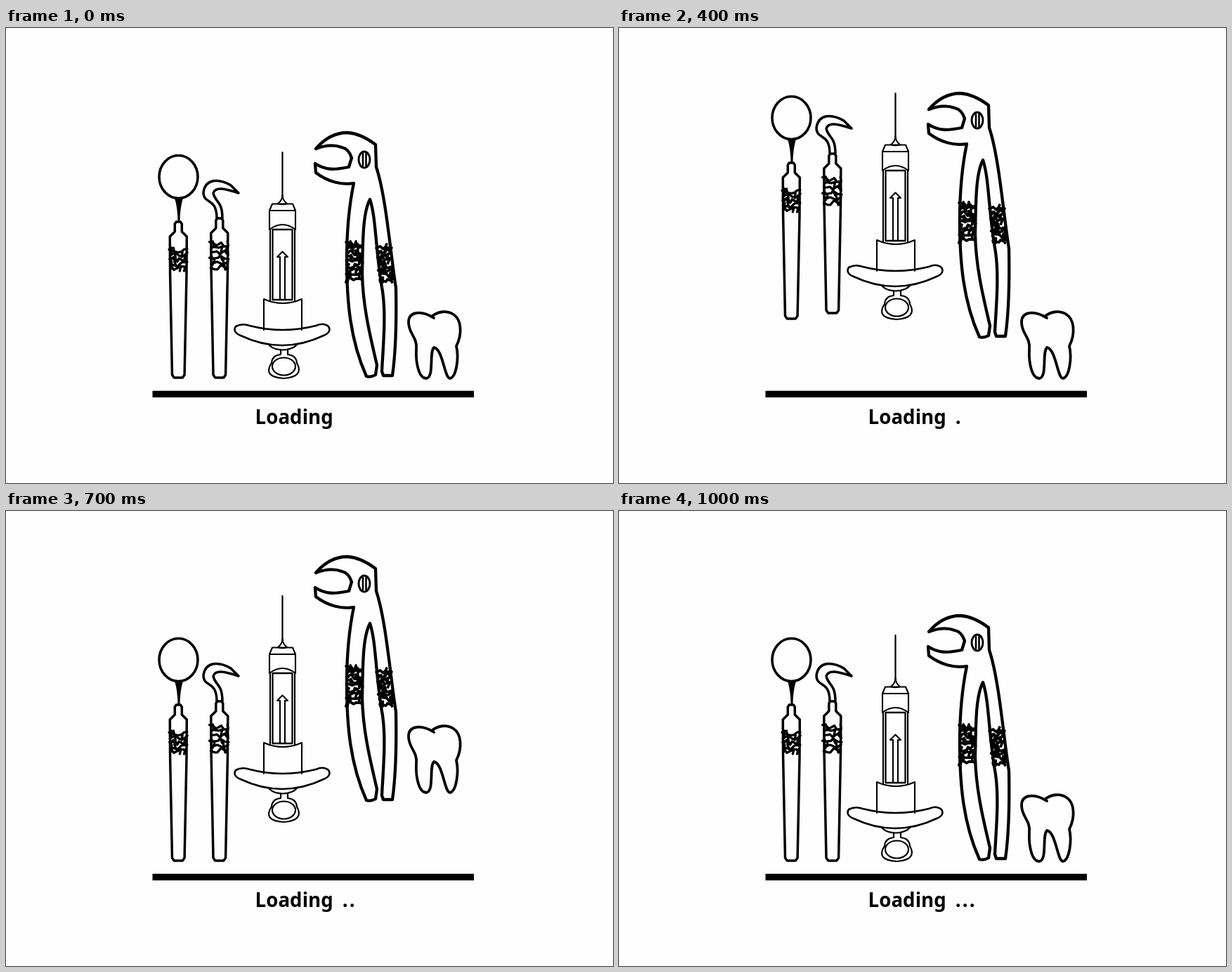
These frames come from a looping animation (864 px wide and 648 px high, 1100 ms). An HTML page with a canvas:

```html
<!DOCTYPE html>
<html lang="en">
<head>
<meta charset="utf-8">
<title>Loading</title>
<style>
html, body { margin: 0; width: 100%; height: 100%; overflow: hidden; background: #fdfefd; }
canvas { display: block; }
</style>
</head>
<body>
<canvas id="stage" width="864" height="648"></canvas>
<script>
const ctx = document.getElementById('stage').getContext('2d');
const STEP = 100, STEPS = 11, FLOOR = 498;

function line(shape, width) {
  ctx.lineWidth = width;
  ctx.stroke(typeof shape === 'string' ? new Path2D(shape) : shape);
}

function ellipse(x, y, rx, ry) {
  const path = new Path2D();
  path.ellipse(x, y, rx, ry, 0, 0, Math.PI * 2);
  return path;
}

// Closed outline, symmetric about cx, from [half width, y] pairs.
function symmetric(cx, half) {
  const path = new Path2D();
  half.forEach(([w, y]) => path.lineTo(cx - w, y));
  half.reverse().forEach(([w, y]) => path.lineTo(cx + w, y));
  path.closePath();
  return path;
}

function handle(cx, top) {
  return symmetric(cx, [
    [3, top], [5, top + 3], [5, top + 14], [12, top + 21],
    [11.7, top + 75], [8.8, FLOOR - 4], [6, FLOOR]
  ]);
}

function random(seed) {
  return () => (seed = seed * 16807 % 2147483647) / 2147483647;
}

// Scribbled band: wavering rows, with a few strokes joining them.
function grip(x, y, w, h, seed, slant = 0) {
  const path = new Path2D(), rnd = random(seed);
  const jitter = size => (rnd() - 0.5) * size;
  const rows = Math.round(h / 6.5), cols = 5, gap = h / rows;
  for (let r = 0; r < rows; r++) {
    const left = x + slant * r / rows, mid = y + (r + 0.5) * gap;
    for (let c = 0; c <= cols; c++) {
      path.lineTo(left + c * w / cols + jitter(4), mid + jitter(7));
    }
    for (let j = 0; j < 2; j++) {
      const px = left + rnd() * w;
      path.moveTo(px, mid - gap / 2);
      path.lineTo(px + jitter(6), mid + gap / 2);
    }
    path.moveTo(left + jitter(4), mid + gap);
  }
  return path;
}

const mirrorGrip = grip(234, 313, 23, 33, 41);
const probeGrip = grip(291.5, 304, 24, 40, 77);
const leftGrip = grip(486, 304, 21, 58, 123);
const rightGrip = grip(529, 308, 18, 54, 219, 4);

function mirror() {
  line(ellipse(245.5, 212, 27.5, 30.5), 3.6);
  ctx.fill(new Path2D('M240 242 H252 Q247.5 257 247.5 276 H244.5 Q244.5 257 240 242Z'));
  line(handle(245.3, 276), 3.5);
  line(mirrorGrip, 3.3);
}

function probe() {
  line(`M300 271 C300 240 281 252 281 234 C284 214 303 214 320 224 L331 235
    C310 228 298 226 295 235 C297 248 308 245 308 271`, 3.5);
  line(handle(303.8, 271), 3.5);
  line(probeGrip, 3.3);
}

function syringe() {
  line('M393.5 177 V240', 2.2);
  line('M387 250 Q393 246 393.5 238 Q394 246 400 250 Q393.5 252.5 387 250', 2.1);
  line('M379 250.5 H408 L412 260 V287 Q393.5 273 375 287 V260Z M375 260 H412', 2.1);
  line('M376 286 V389 M411 286 V389', 2.1);
  line('M379.5 287 H407.5 V387 H379.5Z', 2.3);
  line('M390 387 V326 H386 L393.5 318.5 L401 326 H397 V387', 2.1);
  line('M367 430 V386 Q394 398 421 386 V430', 2.1);
  line(`M327 425 Q336 420 347 424 Q393 436 441 424 Q452 419 459 425
    Q464 433 452 438 Q393 466 334 438 Q322 433 327 425Z`, 2.6);
  line('M375 452 Q381 458 394 458.5 Q408 458 414 451', 2.2);
  line(`M391 459 V465 Q379 466 378 477 Q365 497 395 499
    Q425 497 414 477 Q413 466 401 465 V459`, 2.2);
  line(ellipse(395.5, 482, 16.5, 12.5), 2.2);
}

function forceps() {
  line(`M441 172 C453 158 468 149 486 149 C502 150 514 157 526 166 L527 198
    C541 240 547 320 555 370 C556 420 555 460 550 495 H537 L535 489
    C537 450 541 410 536 375 C526 320 527 270 518 244
    C507 265 508 310 507 350 C508 400 520 445 528 480 L526 494 Q519 498 513 496
    C490 445 485 390 485 330 C485 285 490 245 495 221
    C478 224 458 219 441 206 L440 193 C455 203 468 202 488 198
    L492 185 Q488 172 478 170 Q462 164 441 172Z`, 4.3);
  line(ellipse(510, 187.5, 8, 11.5), 3);
  line('M508 179 V196 M512.5 179 V196', 2.6);
  line(leftGrip, 3.7);
  line(rightGrip, 3.7);
}

function tooth() {
  line(`M609 413 C592 402 573 403 573 419 C573 436 586 440 584 458
    C583 478 588 499 598 499 C610 498 602 462 609 455
    C622 457 624 499 632 499 C641 497 645 470 641 453
    C650 435 648 415 637 408 C628 402 615 403 606 411`, 3.8);
}

const tools = [
  { paint: mirror, top: 98 },
  { paint: probe, top: 92 },
  { paint: syringe, top: 98 },
  { paint: forceps, top: 98 },
  { paint: tooth, top: 98 }
];

// A hop spans six steps; the drop doubles with each step from the peak.
function hop(i) {
  return Math.max(0, 112 - 14 * 2 ** Math.abs(i - 3));
}

function draw(now) {
  const step = Math.floor(now / STEP) % STEPS;
  ctx.fillStyle = '#fdfefd';
  ctx.fillRect(0, 0, 864, 648);
  ctx.fillStyle = ctx.strokeStyle = '#000';
  ctx.lineCap = ctx.lineJoin = 'round';

  tools.forEach(({ paint, top }, i) => {
    ctx.save();
    ctx.translate(0, -Math.min(top, hop(step - i)));
    paint();
    ctx.restore();
  });

  ctx.fillRect(208.5, 516.7, 457.5, 9.4);
  ctx.font = 'bold 27.7px "Noto Sans", "Open Sans", sans-serif';
  ctx.textAlign = 'left';
  ctx.fillText('Loading', 354.6, 564);
  ctx.textAlign = 'center';
  const dots = Math.floor((step + 1) / 3);
  for (let i = 0; i < dots; i++) ctx.fillText('.', 482.8 + i * 10, 564);
}

const start = performance.now();
function tick() {
  draw(performance.now() - start);
  requestAnimationFrame(tick);
}
tick();
</script>
</body>
</html>
```
